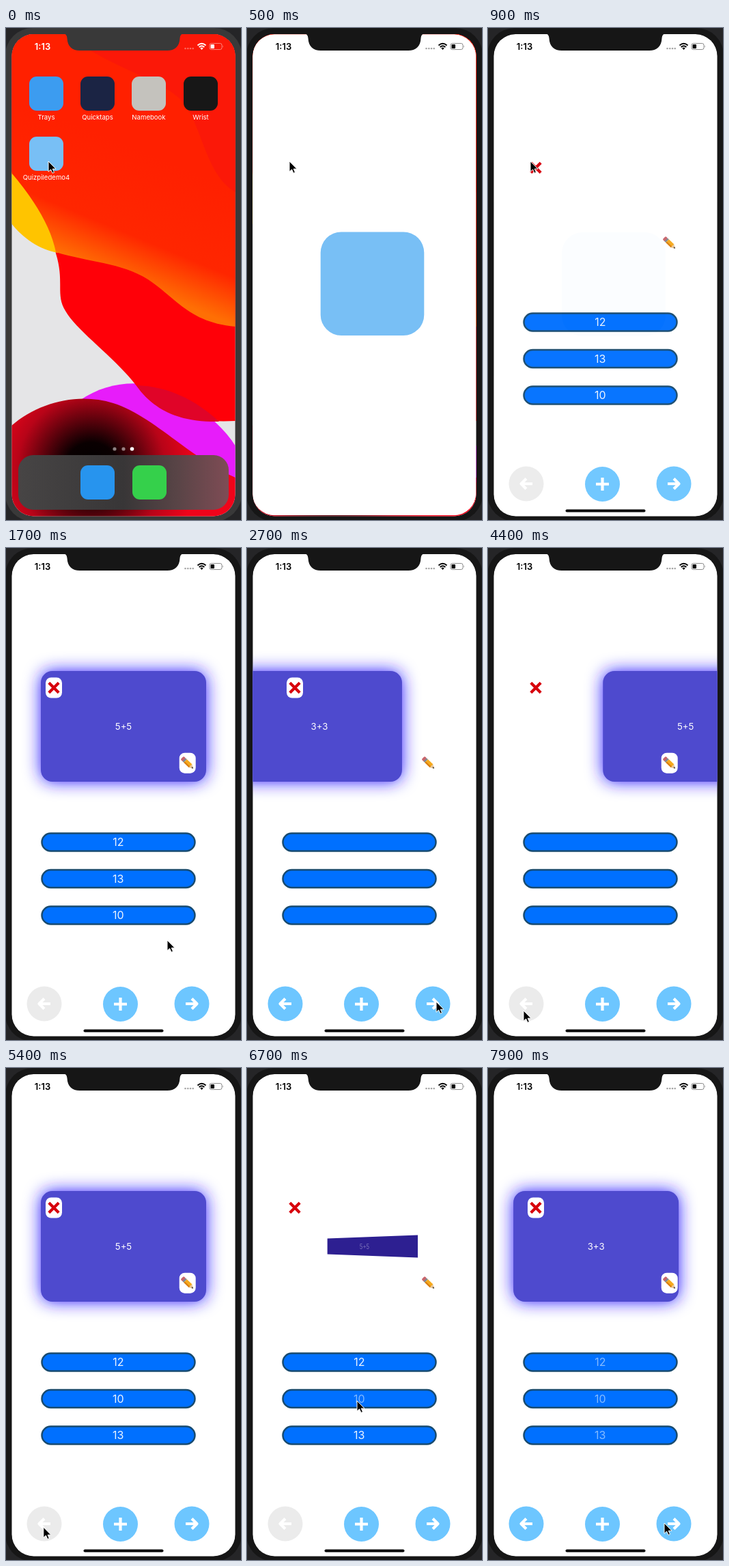
An HTML page that plays this animation: 344x720 px, repeating every 8 s.

```html
<!DOCTYPE html>
<html lang="en">
<head>
<meta charset="utf-8">
<title>Card quiz</title>
<style>
html, body { margin: 0; width: 100%; height: 100%; overflow: hidden; background: #252527; }
svg { display: block; width: 100vw; height: 100vh; }
text { font-family: Inter, Roboto, "Liberation Sans", sans-serif; text-anchor: middle; }
</style>
</head>
<body>
<svg id="stage" viewBox="0 0 344 720" xmlns="http://www.w3.org/2000/svg"></svg>
<script>
const LOOP = 8000;
const REST = { x: 51, y: 180, w: 242, h: 162, cx: 172, cy: 261 };
const ROWS = [430.5, 484, 537.5];

const clamp = v => Math.max(0, Math.min(1, v));
const lerp = (a, b, p) => a + (b - a) * p;
const span = (t, start, length) => clamp((t - start) / length);
const ease = p => p * p * (3 - 2 * p);
const easeOut = p => 1 - (1 - p) ** 3;

const tile = (x, y, color) => `<rect x="${x}" y="${y}" width="50" height="50" rx="11" fill="${color}"/>`;
const app = (x, y, color, name) => tile(x, y, color) +
  `<text x="${x + 25}" y="${y + 63}" font-size="9.6" fill="#fff">${name}</text>`;
const round = (id, x, y, icon) => `<circle id="${id}" cx="${x}" cy="${y}" r="25.5" fill="#6dc6ff"/>
  <path transform="translate(${x} ${y})" d="${icon}" fill="none" stroke="#fff" stroke-width="4.2" stroke-linejoin="round"/>`;
const badge = (x, y) => `<rect x="${x - 12}" y="${y - 15}" width="24" height="30" rx="8" fill="#fff"/>`;

const wallpaper = `
  <rect x="8" y="9" width="328" height="706" fill="#e5e5e7"/>
  <path d="M108 545C145 519 190 515 225 526C280 548 320 585 336 612V665H200Z" fill="#e71cfa"/>
  <path d="M8 214C48 260 66 295 73 330C86 372 72 390 87 414C104 444 160 482 192 525C220 565 270 578 336 575V9H8Z" fill="#ff0008"/>
  <path d="M191 523C220 565 262 577 312 576C282 548 240 524 191 523Z" fill="#e00428"/>
  <path d="M8 210V286C24 307 50 325 76 329C68 291 42 252 8 210Z" fill="#ffc400"/>
  <path d="M8 9V212C42 252 66 292 73 328C122 343 168 343 208 368C250 396 268 431 336 437V9Z" fill="url(#flame)"/>
  <path d="M95 9C130 50 218 70 254 103C287 135 290 215 336 240V9Z" fill="#fb170a" opacity=".8"/>
  <path d="M8 582C48 548 105 533 157 549C215 567 270 630 336 658V715H8Z" fill="url(#ember)"/>`;

const home = `${wallpaper}
  ${app(34, 71, "#3c9cf0", "Trays")}
  ${app(109, 71, "#1b2444", "Quicktaps")}
  ${app(184, 71, "#c4c2bd", "Namebook")}
  ${app(260, 71, "#171717", "Wrist")}
  ${app(34, 159, "#78bff5", "Quizpiledemo4")}
  <g fill="#fff"><circle cx="159" cy="616" r="2.6" opacity=".5"/><circle cx="172" cy="616" r="2.6" opacity=".5"/><circle cx="184.5" cy="616" r="2.8"/></g>
  <rect x="18" y="625" width="308" height="80" rx="22" fill="url(#dock)"/>
  ${tile(109, 640, "#2794ee")}${tile(185, 640, "#35d04b")}`;

const quiz = `
  <rect x="8" y="9" width="328" height="706" fill="#fff"/>
  <g id="card">
    <rect x="51" y="180" width="242" height="162" rx="17" fill="#2a1cff" filter="url(#glow)"/>
    <rect x="51" y="180" width="242" height="162" rx="17" fill="#4e4ace"/>
  </g>
  <path id="flip"/>
  <text id="face" font-size="13.2" fill="#fff" y="4.8"></text>
  ${badge(70, 204.5)}
  <path d="M62.8 197.3L77.2 211.7M77.2 197.3L62.8 211.7" stroke="#d7000c" stroke-width="4.2"/>
  ${badge(265.7, 314.7)}
  <g transform="translate(265.7 314.7) rotate(44)">
    <rect x="-11" y="-3.3" width="4.5" height="6.6" rx="1.5" fill="#c9656c"/>
    <rect x="-7" y="-3.3" width="2.6" height="6.6" fill="#7d8791"/>
    <rect x="-4.4" y="-3.3" width="10.5" height="6.6" fill="#f5a91c"/>
    <path d="M-4.4 1.2H6.1V3.3H-4.4Z" fill="#d87c12"/>
    <path d="M6 -3.3L11.5 0L6 3.3Z" fill="#e9c391"/><path d="M9.2 -1.4L11.7 0L9.2 1.4Z" fill="#333"/>
  </g>
  ${ROWS.map((y, i) => `<rect x="52.5" y="${y - 13}" width="224" height="26" rx="13" fill="#0070ff" stroke="#184b70" stroke-width="2.5"/>
    <text id="answer${i}" x="164.3" y="${y + 5.8}" font-size="16" fill="#fff"></text>`).join("")}
  ${round("back", 56, 667, "M9 0H-7M0 -7.5L-7.5 0L0 7.5")}
  ${round("add", 167.5, 667.5, "M-9.5 0H9.5M0 -9.5V9.5")}
  ${round("next", 272, 667, "M-9 0H7M0 -7.5L7.5 0L0 7.5")}
  <rect x="113.5" y="704.5" width="117" height="4" rx="2" fill="#000"/>`;

document.getElementById("stage").innerHTML = `
  <defs>
    <clipPath id="screen"><rect x="8.5" y="9" width="327" height="705.5" rx="32"/></clipPath>
    <clipPath id="window"><rect id="windowShape"/></clipPath>
    <filter id="glow" x="-30%" y="-40%" width="160%" height="180%"><feGaussianBlur stdDeviation="12.5"/></filter>
    <linearGradient id="flame" gradientUnits="userSpaceOnUse" x1="250" y1="200" x2="179" y2="371">
      <stop offset="0" stop-color="#ff2000"/><stop offset=".65" stop-color="#ff2600"/><stop offset="1" stop-color="#ff6f04"/>
    </linearGradient>
    <radialGradient id="ember" gradientUnits="userSpaceOnUse" cx="125" cy="645" r="155">
      <stop offset="0" stop-color="#000"/><stop offset=".25" stop-color="#0a0001"/><stop offset=".7" stop-color="#b80418"/><stop offset="1" stop-color="#f0041a"/>
    </radialGradient>
    <linearGradient id="dock">
      <stop offset="0" stop-color="#474545"/><stop offset=".5" stop-color="#383637"/><stop offset=".75" stop-color="#584446"/><stop offset="1" stop-color="#7f4c55"/>
    </linearGradient>
  </defs>
  <rect width="344" height="720" fill="#252527"/>
  <rect id="bezel" x="-1" y="0" width="346" height="722" rx="40"/>
  <g clip-path="url(#screen)">
    <g id="home">${home}</g>
    <g id="quiz" clip-path="url(#window)">${quiz}
      <g id="launch">
        <rect x="8" y="9" width="328" height="706" fill="#fff"/>
        <rect id="logo" fill="#78bff5"/>
      </g>
    </g>
  </g>
  <path id="notch" d="M84 8C88 9 89 11 89.500 15C90 27 97 33 108 33H236C247 33 254 27 254.500 15C255 11 256 9 260 8Z"/>
  <g id="status">
    <text x="53.500" y="31.500" font-size="13" font-weight="600">1:13</text>
    <g opacity=".35"><circle cx="262.500" cy="30" r="1.300"/><circle cx="266.300" cy="30" r="1.300"/><circle cx="270" cy="30" r="1.300"/><circle cx="273.700" cy="30" r="1.300"/></g>
    <path d="M280.500 25.500Q286.500 20 292.500 25.500M282.700 28Q286.500 24.500 290.300 28" fill="none" stroke="currentColor" stroke-width="2"/>
    <path d="M284.300 29.500Q286.500 27.700 288.700 29.500L286.500 32Z"/>
    <rect x="298" y="22.500" width="18" height="9" rx="2.600" fill="none" stroke="currentColor" opacity=".45"/>
    <path d="M317.300 25.300Q319 27 317.300 28.700Z" opacity=".45"/>
    <rect x="299.500" y="24" width="5.500" height="6" rx="1"/>
  </g>
  <path id="cursor" d="M0 0V15.300L3.600 12L6 17.400L8.500 16.300L6.200 11.200H11Z" fill="#000" stroke="#fff" stroke-width="1" stroke-linejoin="round"/>`;

const el = {};
document.querySelectorAll("[id]").forEach(node => el[node.id] = node);
const set = (node, attrs) => Object.entries(attrs).forEach(([k, v]) => node.setAttribute(k, v));

// Each move: start time, direction the card leaves in
const SWIPES = [[2610, -1], [4273, 1], [7862, -1]];
const SWIPE = 300;
const FLIP = { start: 6523, length: 400 };

// Titles are shuffled on each tap and once more when the card has left
const TITLES = [
  [0, "12", "13", "10"], [2610, "8", "6", "9"], [2910, "6", "8", "9"],
  [4273, "10", "12", "13"], [4573, "12", "10", "13"], [7862, "8", "9", "6"]
];

const PATH = [
  [0, 62, 195], [1000, 62, 195], [1650, 236, 574], [1900, 236, 574], [2450, 277, 664], [3300, 277, 664],
  [4100, 52, 677], [5300, 52, 677], [6350, 161, 487], [6900, 161, 487], [7700, 258, 666], [8000, 258, 666]
];

function cursorAt(t) {
  const i = Math.max(1, PATH.findIndex(point => point[0] >= t));
  const [t0, x0, y0] = PATH[i - 1], [t1, x1, y1] = PATH[i];
  const p = ease(span(t, t0, t1 - t0));
  return [lerp(x0, x1, p), lerp(y0, y1, p)];
}

function swipeOffset(t) {
  for (const [start, dir] of SWIPES) {
    if (t >= start && t < start + SWIPE) return 300 * dir * ease(span(t, start, SWIPE));
    if (t >= start + SWIPE && t < start + 2 * SWIPE) return -300 * dir * (1 - ease(span(t, start + SWIPE, SWIPE)));
  }
  return 0;
}

function titleAt(slot, t) {
  let text = TITLES[0][slot + 1], previous = "", changed = -1000;
  for (const row of TITLES) {
    if (row[0] <= t && row[slot + 1] !== text) [previous, text, changed] = [text, row[slot + 1], row[0]];
  }
  const age = t - changed;
  return age < 90 ? [previous, 1 - age / 90] : [text, span(age, 210, 190)];
}

function drawLaunch(t) {
  const p = easeOut(span(t, 140, 430));
  set(el.home, { visibility: p < 1 ? "visible" : "hidden" });
  set(el.quiz, { visibility: t < 140 ? "hidden" : "visible" });
  set(el.windowShape, {
    x: lerp(34, 8, p), y: lerp(159, 9, p), width: lerp(50, 328, p), height: lerp(50, 706, p), rx: lerp(11, 32, p)
  });
  const size = lerp(50, 152, p);
  set(el.logo, { x: lerp(59, 184, p) - size / 2, y: lerp(184, 375, p) - size / 2, width: size, height: size, rx: size * .2 });
  set(el.launch, { opacity: 1 - .97 * ease(span(t, 600, 300)) - .03 * span(t, 900, 90) });
  const ink = p > .6 ? "#000" : "#fff";
  set(el.status, { fill: ink, color: ink });
  const shell = t < 100 ? "#393939" : "#161616";
  set(el.bezel, { fill: shell });
  set(el.notch, { fill: shell });
}

function drawCard(t, second) {
  const age = Math.max(0, t - 1000) / 1000;
  const scale = 1 - .25 * Math.exp(-11 * age) * Math.cos(7 * age);
  const shown = span(t, 1000, 300);
  const dx = swipeOffset(t);
  const p = span(t, FLIP.start, FLIP.length);
  const flipping = p > 0 && p < 1;
  const k = Math.sin(Math.PI * p);

  set(el.card, {
    transform: `translate(${REST.cx + dx} ${REST.cy}) scale(${scale}) translate(${-REST.cx} ${-REST.cy})`,
    opacity: flipping ? 0 : shown
  });

  const halfWidth = REST.w / 2 * (1 - .46 * k);
  const halfHeight = REST.h / 2 * Math.abs(Math.cos(Math.PI * p));
  const cx = REST.cx + 12 * k, near = halfHeight * (1 + .18 * k), far = halfHeight * (1 - .18 * k);
  const left = cx - halfWidth, right = cx + halfWidth;
  set(el.flip, {
    d: `M${left} ${REST.cy - far}L${right} ${REST.cy - near}V${REST.cy + near}L${left} ${REST.cy + far}Z`,
    fill: `rgb(${78 - 34 * k},${74 - 44 * k},${206 - 62 * k})`,
    opacity: flipping ? 1 : 0
  });

  el.face.textContent = second ? "3+3" : p > .5 ? "10" : "5+5";
  set(el.face, {
    transform: `translate(${REST.cx + dx} ${REST.cy}) scale(${scale * (1 - .42 * k)} ${scale * (1 - .25 * k)})`,
    opacity: shown * (1 - .65 * k)
  });
}

function draw(t) {
  const second = (t >= SWIPES[0][0] && t < SWIPES[1][0]) || t >= SWIPES[2][0];
  drawLaunch(t);
  drawCard(t, second);
  ROWS.forEach((_, i) => {
    const [text, alpha] = titleAt(i, t);
    const pressed = i === 1 && t > 6450 && t < 6850;
    el["answer" + i].textContent = text;
    set(el["answer" + i], { opacity: alpha * (pressed ? .5 : .92) });
  });
  set(el.back, { fill: second ? "#6dc6ff" : "#ebebeb" });
  set(el.cursor, { transform: `translate(${cursorAt(t)})` });
}

function tick(now) {
  draw(now % LOOP);
  requestAnimationFrame(tick);
}
draw(0);
requestAnimationFrame(tick);
</script>
</body>
</html>
```
